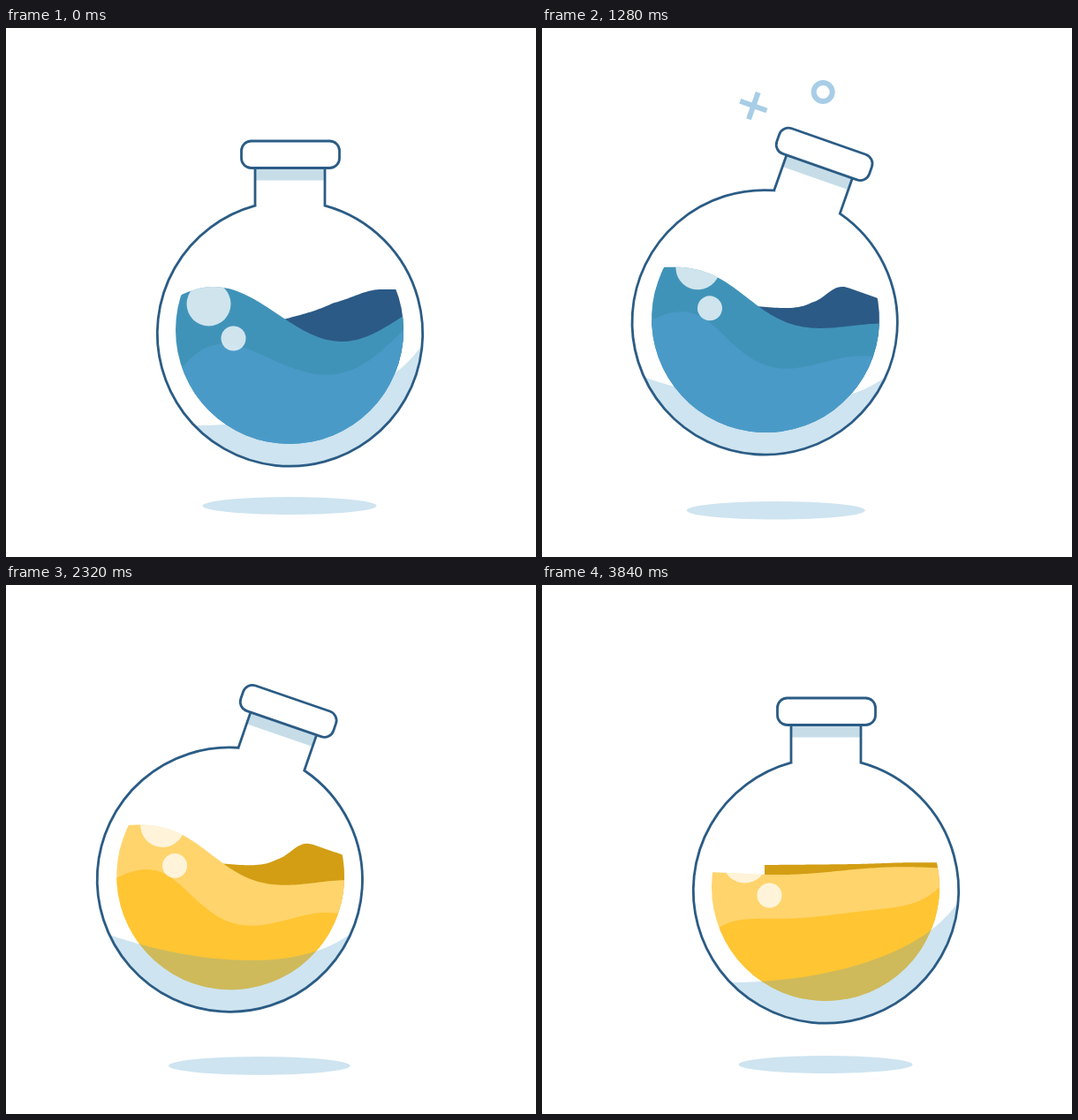
An HTML page with a canvas for the animation above (3880 ms loop, 600 px wide and 599 px high).

```html
<!DOCTYPE html>
<html lang="en">
<head>
<meta charset="utf-8">
<title>Swinging flask</title>
<style>
  html, body { margin: 0; width: 100%; height: 100%; overflow: hidden; background: #fff; }
  canvas { display: block; }
</style>
</head>
<body>
<canvas id="stage" width="600" height="599"></canvas>
<script>
const ctx = document.getElementById('stage').getContext('2d');
const LOOP = 3880, STEP = 40, SLOSH = 1040;
const RAD = Math.PI / 180, TURN = 2 * Math.PI;
const PIVOT = { x: 322, y: 136 };
const LIQUID = { x: 321, y: 342, r: 129 };
const LINE = '#2b5c85', TINT = 'rgba(74,154,200,0.27)', SPARK = '#7cb4da';

const lerp = (a, b, k) => a + (b - a) * k;
const clamp01 = k => Math.min(1, Math.max(0, k));
const easeInOut = k => k < 0.5 ? 2 * k * k : 1 - 2 * (1 - k) ** 2;
const easeOut = (k, power) => 1 - (1 - k) ** power;

// Eases from one turning point [time, value] to the next.
function sway(turns, t) {
  let i = 0;
  while (i < turns.length - 2 && t >= turns[i + 1][0]) i++;
  const [t0, a] = turns[i], [t1, b] = turns[i + 1];
  return lerp(a, b, easeInOut(clamp01((t - t0) / (t1 - t0))));
}

const LEFT = 20.8, RIGHT = -24.3, SETTLE = 12.2;
const ANGLE = [[0, 0], [630, RIGHT], [1200, LEFT], [1830, RIGHT], [2400, LEFT],
  [3090, -SETTLE], [3480, SETTLE], [3840, 0]];
const SHADOW_X = [[0, 321], [560, 412], [1150, 250], [1780, 423], [2560, 255], [3080, 370], [3500, 275], [3840, 321]];
const SHADOW_Y = [[0, 541], [690, 486], [1220, 547], [1940, 494], [2430, 550], [3240, 543]];
const SHADOW_R = [[0, 98.5], [640, 82], [1150, 103], [1800, 77], [2450, 105], [3200, 98.5]];

// The flask shortens as it leans right, during the two big swings only.
function squash(angle, t) {
  const weight = t < 2400 ? easeInOut(clamp01(t / 600)) : 0;
  return 1 - 0.096 * weight * (LEFT - angle) / (LEFT - RIGHT);
}

function blend(from, to, t) {
  const k = clamp01((t - 1440) / 320);
  return `rgb(${from.map((v, i) => Math.round(lerp(v, to[i], k)))})`;
}

function disc(x, y, r) {
  ctx.beginPath();
  ctx.arc(x, y, r, 0, TURN);
}

// Samples a surface from left to right and closes it below.
function layer(from, to, floor, point) {
  const path = new Path2D(), start = point(from);
  path.moveTo(...start);
  for (let x = from + 3; x <= to; x += 3) path.lineTo(...point(x));
  path.lineTo(480, 310);
  path.lineTo(480, floor);
  path.lineTo(start[0], floor);
  path.closePath();
  return path;
}

// A wave runs left through the flask, faster and faster in each cycle.
function liquidLayers(t) {
  const p = t % SLOSH / SLOSH;
  const kick = Math.exp(-t / 200);
  const calm = Math.exp(-Math.max(0, t - 3000) / 500);
  const swell = Math.sin(Math.PI * p) ** 2;
  const length = 245 + 45 * kick;
  const crest = 235 + length * (1 - p ** 3);
  const side = x => (x - LIQUID.x) / LIQUID.r;
  const wave = (x, height) =>
    -calm * (22 * swell * side(x) + height * Math.cos(TURN * (x - crest) / length));

  const mid = x => [x, 324 + wave(x, 16 + 15 * kick)];
  const front = x => {
    const u = side(x);
    return [x, 374 - 26 * u ** 5 - 6 * u * u + (1 - u ** 4) * wave(x + 10, 20)];
  };
  const back = x => {
    const rise = Math.exp(-((Math.max(0, 425 - x) / 45) ** 2));
    const slope = 0.25 * Math.max(0, 370 - x);
    return [x - 62 * swell * calm * rise,
      316 + calm * calm * (slope - (20 + 42 * swell) * rise)];
  };
  return {
    back: layer(252, 480, 390, back),
    mid: layer(192, 450, 480, mid),
    front: layer(192, 450, 480, front)
  };
}

function drawLiquid(t) {
  const { back, mid, front } = liquidLayers(t);
  ctx.save();
  disc(LIQUID.x, LIQUID.y, LIQUID.r);
  ctx.clip();
  ctx.fillStyle = blend([43, 90, 134], [211, 158, 20], t);
  ctx.fill(back);
  ctx.fillStyle = blend([64, 147, 184], [255, 212, 108], t);
  ctx.fill(mid);
  ctx.fillStyle = blend([74, 154, 200], [255, 197, 51], t);
  ctx.fill(front);
  ctx.clip(mid);
  ctx.fillStyle = 'rgba(255,255,255,0.75)';
  disc(229.5, 312.5, 25);
  ctx.fill();
  disc(257.5, 351.5, 14);
  ctx.fill();
  ctx.restore();
}

function drawShade() {
  ctx.save();
  disc(321.5, 346, 150);
  ctx.clip();
  ctx.fillStyle = TINT;
  ctx.beginPath();
  ctx.moveTo(200, 450);
  ctx.lineTo(212, 450);
  ctx.bezierCurveTo(320, 450, 430, 420, 470, 360);
  ctx.lineTo(480, 345);
  ctx.lineTo(480, 500);
  ctx.lineTo(200, 500);
  ctx.fill();
  ctx.restore();
  ctx.fillStyle = '#c6dde8';
  ctx.fillRect(282, 159, 79, 13.5);
}

function outlinePath() {
  const a = Math.atan2(-145, -39.5);
  ctx.beginPath();
  ctx.roundRect(266.5, 128, 111, 30.5, 11);
  ctx.moveTo(282, 158.5);
  ctx.lineTo(282, 201);
  ctx.arc(321.5, 346, 150.2, a, -Math.PI - a, true);
  ctx.lineTo(361, 158.5);
}

function drawFlask(t) {
  const angle = sway(ANGLE, t);
  ctx.save();
  ctx.translate(PIVOT.x, PIVOT.y);
  ctx.rotate(angle * RAD);
  ctx.scale(1, squash(angle, t));
  ctx.translate(-PIVOT.x, -PIVOT.y);
  drawLiquid(t);
  drawShade();
  outlinePath();
  ctx.restore();
  ctx.strokeStyle = LINE;
  ctx.lineWidth = 2.8;
  ctx.stroke();
}

function drawShadow(t) {
  const r = sway(SHADOW_R, t);
  ctx.fillStyle = TINT;
  ctx.beginPath();
  ctx.ellipse(sway(SHADOW_X, t), sway(SHADOW_Y, t), r, r * 0.101, 0, 0, TURN);
  ctx.fill();
}

// A plus and a ring float out of the neck and fade.
function drawSymbols(k) {
  if (k <= 0 || k >= 1) return;
  const ring = easeOut(k, 1.4), plus = easeOut(k, 3);
  ctx.save();
  ctx.strokeStyle = SPARK;
  ctx.lineWidth = 6;
  ctx.globalAlpha = 0.85 * Math.sin(Math.PI * k);
  disc(338 - 24 * ring, 142 - 84 * ring, 10.5);
  ctx.stroke();
  ctx.translate(296 - 58 * plus, 135 - 48 * plus);
  ctx.rotate(20 * plus * RAD);
  ctx.beginPath();
  ctx.moveTo(-16, 0);
  ctx.lineTo(16, 0);
  ctx.moveTo(0, -16);
  ctx.lineTo(0, 16);
  ctx.stroke();
  ctx.restore();
}

function drawRays(x, y, middle, spread, outer, length) {
  ctx.beginPath();
  for (let i = -1; i <= 1; i++) {
    const a = (middle + i * spread) * RAD, c = Math.cos(a), s = Math.sin(a);
    ctx.moveTo(x + c * (outer - length), y + s * (outer - length));
    ctx.lineTo(x + c * outer, y + s * outer);
  }
  ctx.stroke();
}

function drawBurst(k) {
  if (k <= 0 || k >= 1) return;
  const outer = 62 + 45 * k;
  ctx.save();
  ctx.globalAlpha = 0.65 * Math.sin(Math.PI * k);
  ctx.strokeStyle = SPARK;
  ctx.lineCap = 'round';
  ctx.lineWidth = 6;
  drawRays(273, 143, 226, 28, outer, 9);
  drawRays(401, 263, -55, 20.5, outer + 2, 20);
  ctx.restore();
}

function draw(t) {
  ctx.fillStyle = '#fff';
  ctx.fillRect(0, 0, 600, 599);
  drawShadow(t);
  for (const start of [0, 880, 1600, 2440]) drawSymbols((t - start) / 560);
  drawBurst((t - 3160) / 480);
  drawFlask(t);
}

const began = performance.now();
function tick() {
  const t = (performance.now() - began) % LOOP;
  draw(Math.floor(t / STEP) * STEP);
  requestAnimationFrame(tick);
}
tick();
</script>
</body>
</html>
```
